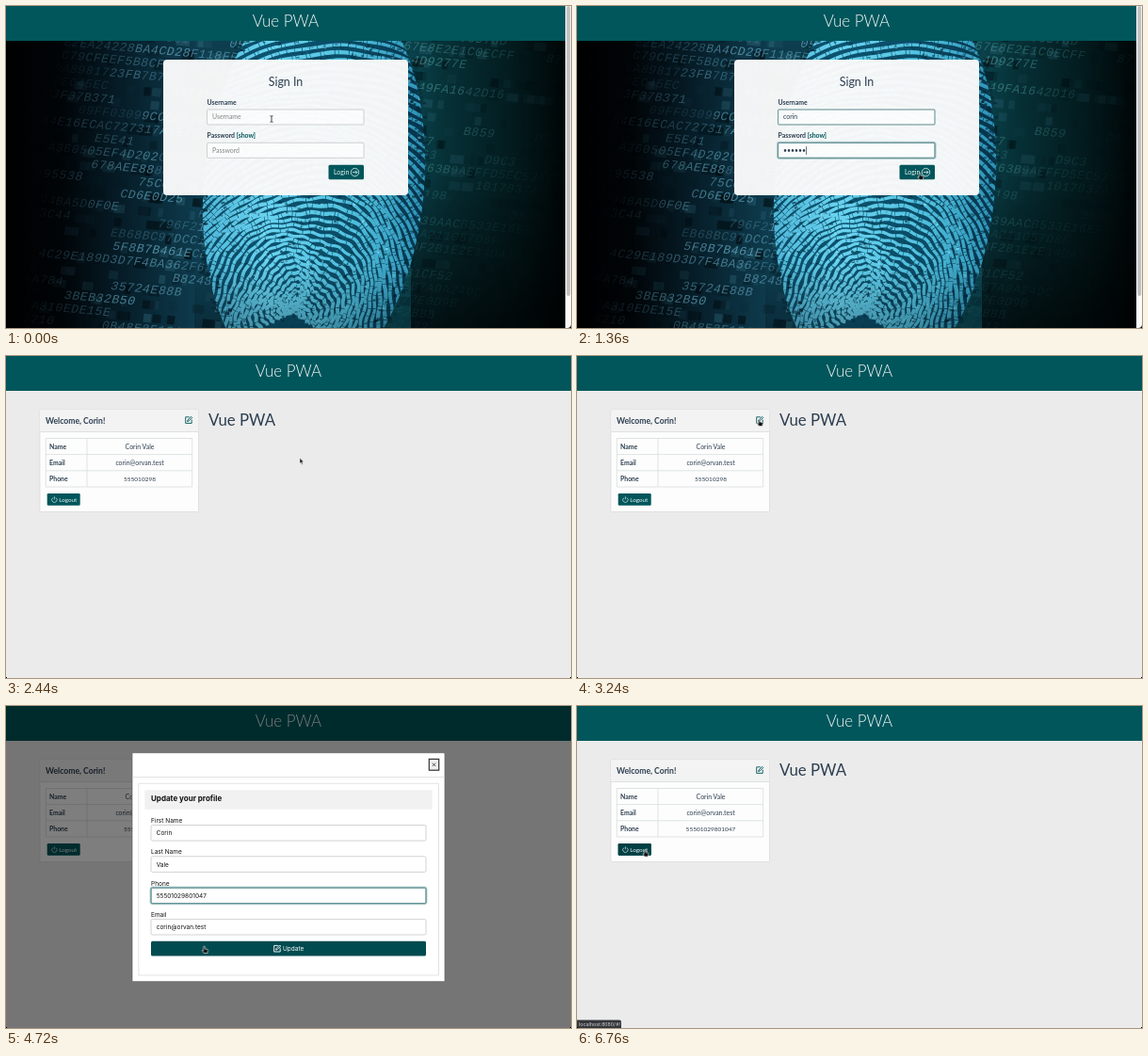
An HTML page with a canvas for the animation above (6.8 s loop, 600 px wide and 342 px high).

```html
<!DOCTYPE html>
<html lang="en">
<head>
<meta charset="utf-8">
<title>Vue PWA</title>
<style>
html, body { margin: 0; width: 100%; height: 100%; overflow: hidden; background: #000; }
.stage { position: relative; width: 600px; height: 342px; overflow: hidden; border-radius: 0 0 4px 4px; }
canvas, svg { position: absolute; left: 0; top: 0; display: block; }
text { font-family: Lato, "Open Sans", sans-serif; font-size: 6.9px; fill: #2c3e50; white-space: pre; }
.b { font-weight: 700; }
.mid { text-anchor: middle; }
.title { font-size: 16.9px; font-weight: 300; fill: #f2f7f7; }
.white { fill: #eaf3f3; }
.hint { fill: #858585; }
.teal { fill: #00565b; }
.line { fill: none; stroke: #3f8083; }
.field { fill: #fff; fill-opacity: .6; stroke: #bdc0c2; stroke-width: .7; }
.glow { fill: none; stroke: #00565b; stroke-opacity: .25; stroke-width: 2.2; }
.modal text { font-family: Inter, Roboto, sans-serif; font-size: 6.5px; fill: #111; }
.modal .white { fill: #fff; }
.alert text { font-family: Roboto, Inter, sans-serif; }

/* one shared 6.8 s clock; hard switches unless stated otherwise */
.on, .typed tspan, .caret, .mouse { animation: 6.8s step-end infinite; }
.typed tspan { fill-opacity: 0; animation-name: typed; animation-delay: var(--d); }
.login { animation-name: login; }
.dash { animation-name: dash; }
.skeleton { animation-name: skeleton; }
.card { animation-name: card; }
.alert { animation-name: alert; }
.modal { animation-name: modal; }
.before { animation-name: before; }
.after { animation-name: after; }
.idle1 { animation-name: idle1; }
.valid { animation-name: valid; }
.focus1 { animation-name: focus1; }
.idle2 { animation-name: idle2; }
.focus2 { animation-name: focus2; }
.focus3 { animation-name: focus3; }
.hover { animation-name: hover; }
.ibeam { animation-name: ibeam; }
.arrow { animation-name: arrow; }
.hand { animation-name: hand; }
.caret { fill: #444; }
.c1 { animation-name: caret1; animation-timing-function: steps(5, start); }
.c2 { animation-name: caret2; animation-timing-function: steps(6, start); }
.c3 { animation-name: caret3; animation-timing-function: steps(5, start); }
.mouse { animation-name: mouse; animation-timing-function: ease-in-out; }

@keyframes typed { 0% { fill-opacity: 1; } 60%, 100% { fill-opacity: 0; } }
@keyframes login { 0% { opacity: 1; } 20.59%, 100% { opacity: 0; } }
@keyframes dash { 0% { opacity: 0; } 20.59%, 100% { opacity: 1; } }
@keyframes skeleton { 0% { opacity: 1; } 30%, 100% { opacity: 0; } }
@keyframes card { 0% { opacity: 0; } 30%, 100% { opacity: 1; } }
@keyframes alert { 0% { opacity: 0; } 23.53% { opacity: 1; } 33.53%, 100% { opacity: 0; } }
@keyframes modal { 0% { opacity: 0; } 50.59% { opacity: 1; } 71.18%, 100% { opacity: 0; } }
@keyframes before { 0% { opacity: 1; } 71.18%, 100% { opacity: 0; } }
@keyframes after { 0% { opacity: 0; } 71.18%, 100% { opacity: 1; } }
@keyframes idle1 { 0% { opacity: 1; } 2.35%, 100% { opacity: 0; } }
@keyframes valid { 0% { opacity: 0; } 2.35%, 100% { opacity: 1; } }
@keyframes focus1 { 0% { opacity: 0; } 2.35% { opacity: 1; } 10.59%, 100% { opacity: 0; } }
@keyframes idle2 { 0% { opacity: 1; } 10.59%, 100% { opacity: 0; } }
@keyframes focus2 { 0% { opacity: 0; } 10.59%, 100% { opacity: 1; } }
@keyframes focus3 { 0% { opacity: 0; } 55.88%, 100% { opacity: 1; } }
@keyframes hover { 0% { opacity: 0; } 82.94%, 100% { opacity: 1; } }
@keyframes ibeam { 0% { opacity: 1; } 2.94% { opacity: 0; } 55.29% { opacity: 1; } 58.24%, 100% { opacity: 0; } }
@keyframes arrow {
  0% { opacity: 0; } 17.06% { opacity: 1; } 19.41% { opacity: 0; } 21.18% { opacity: 1; }
  44.12% { opacity: 0; } 50.59% { opacity: 1; } 55.29% { opacity: 0; } 64.12% { opacity: 1; }
  67.06% { opacity: 0; } 71.18% { opacity: 1; } 82.94%, 100% { opacity: 0; }
}
@keyframes hand {
  0% { opacity: 0; } 19.41% { opacity: 1; } 21.18% { opacity: 0; } 44.12% { opacity: 1; }
  50.59% { opacity: 0; } 67.06% { opacity: 1; } 71.18% { opacity: 0; } 82.94%, 100% { opacity: 1; }
}
@keyframes caret1 { 0%, 3.53% { transform: none; } 9.41%, 100% { transform: translateX(17px); } }
@keyframes caret2 { 0%, 12.94% { transform: none; } 18.24%, 100% { transform: translateX(24px); } }
@keyframes caret3 {
  0%, 57.65% { transform: none; opacity: 1; }
  63.53%, 64.7% { transform: translateX(20px); opacity: 1; }
  64.71%, 100% { transform: translateX(20px); opacity: 0; }
}
@keyframes mouse {
  0%, 17.06% { transform: translate(282px, 120px); }
  19.71%, 21.18% { transform: translate(364px, 177px); }
  28.24%, 34.12% { transform: translate(320px, 111px); }
  44.12%, 51.18% { transform: translate(193.5px, 67px); }
  55.88%, 64.12% { transform: translate(246px, 202px); }
  68.24%, 70.6% { transform: translate(210.5px, 255px); }
  71.77%, 75.3% { transform: translate(211px, 260px); }
  83.5%, 100% { transform: translate(72px, 152.5px); }
}
</style>
</head>
<body>
<div class="stage">
<canvas id="bg" width="600" height="342"></canvas>
<svg width="600" height="342" viewBox="0 0 600 342">
  <defs>
    <linearGradient id="bar"><stop stop-color="#d6d6d6"/><stop offset=".45" stop-color="#cbcbcb"/><stop offset="1" stop-color="#e0e0e0"/></linearGradient>
    <g id="pencil" fill="none" stroke="currentColor" stroke-width=".9">
      <path d="M4.8 .8H.7V7.4H7.2V3.6"/><path d="M2.6 5.5L3 4L6.6 .4L7.7 1.5L4.1 5.1Z"/>
    </g>
    <filter id="shade" x="-10%" y="-10%" width="120%" height="130%"><feDropShadow dx="0" dy="1" stdDeviation="2" flood-opacity=".4"/></filter>
  </defs>

  <g class="on login">
    <rect class="teal" width="594" height="37"/>
    <text class="title mid" x="297" y="22">Vue PWA</text>
    <rect x="594" width="6" height="342" fill="#fafafa"/>
    <rect x="595.2" y="0" width="4" height="308" rx="2" fill="#c1c1c1"/>
    <rect x="167" y="57" width="260" height="144" rx="4" fill="#fafafa" fill-opacity=".97"/>
    <text class="mid" x="297" y="84.5" style="font-size:12.4px">Sign In</text>
    <text class="b" x="213.5" y="104.6">Username</text>
    <rect class="field" x="213.5" y="110" width="166.5" height="16" rx="1"/>
    <text class="hint on idle1" x="219" y="120.4">Username</text>
    <rect class="line on valid" x="213.5" y="110" width="166.5" height="16" rx="1" stroke-width=".7"/>
    <g class="on focus1">
      <rect class="glow" x="213" y="109.5" width="167.5" height="17" rx="2"/>
      <rect class="caret c1" x="219" y="113.5" width=".7" height="9"/>
    </g>
    <text class="typed" x="219" y="120.4"><tspan style="--d:240ms">c</tspan><tspan style="--d:320ms">o</tspan><tspan style="--d:400ms">r</tspan><tspan style="--d:480ms">i</tspan><tspan style="--d:560ms">n</tspan></text>
    <text class="b" x="213.5" y="140.2">Password <tspan class="teal">[show]</tspan></text>
    <rect class="field" x="213.5" y="145.3" width="166.5" height="16" rx="1"/>
    <text class="hint on idle2" x="219" y="155.7">Password</text>
    <g class="on focus2">
      <rect class="glow" x="213" y="144.8" width="167.5" height="17" rx="2"/>
      <rect class="line" x="213.5" y="145.3" width="166.5" height="16" rx="1" stroke-width=".7"/>
      <rect class="caret c2" x="219" y="149" width=".7" height="9"/>
    </g>
    <text class="typed" x="219" y="155.7"><tspan style="--d:880ms">•</tspan><tspan style="--d:940ms">•</tspan><tspan style="--d:1000ms">•</tspan><tspan style="--d:1060ms">•</tspan><tspan style="--d:1120ms">•</tspan><tspan style="--d:1180ms">•</tspan></text>
    <rect class="teal" x="342.5" y="168.8" width="37.5" height="15.4" rx="1.5"/>
    <text class="white" x="348" y="178.8">Login</text>
    <g fill="none" stroke="#eaf3f3" stroke-width=".8"><circle cx="370.5" cy="176.6" r="4.2"/><path d="M368 176.6H373M371 174.6L373 176.6L371 178.6"/></g>
  </g>

  <g class="on dash">
    <rect width="600" height="342" fill="#ebebeb"/>
    <rect class="teal" width="600" height="37"/>
    <text class="title mid" x="300" y="22">Vue PWA</text>
    <text x="215" y="74" style="font-size:16.8px">Vue PWA</text>

    <g class="on skeleton">
      <rect x="36" y="57" width="168.5" height="55" fill="#fff" stroke="#dedede" stroke-width=".7"/>
      <g fill="url(#bar)">
        <rect x="42" y="63.7" width="62.5" height="6.5" rx="1"/>
        <rect x="42" y="72.2" width="156" height="6.5" rx="1"/>
        <rect x="42" y="80.6" width="156" height="6.5" rx="1"/>
        <rect x="42" y="89" width="156" height="6.5" rx="1"/>
        <rect x="42" y="97.3" width="156" height="6.5" rx="1"/>
      </g>
    </g>

    <g class="on card">
      <rect x="36" y="57" width="168.5" height="108.5" rx="1" fill="#fdfdfd" stroke="#d8d8d8" stroke-width=".7"/>
      <path d="M36.3 57.3H204.2V80.5H36.3Z" fill="#f3f3f3"/>
      <path d="M36 80.5H204.5M42.3 87.5H197.7V139H42.3ZM42.3 104.6H197.7M42.3 121.8H197.7M86 87.5V139" fill="none" stroke="#d9dcde" stroke-width=".8"/>
      <text class="b" x="42" y="71.7" style="font-size:8.6px">Welcome, Corin!</text>
      <use href="#pencil" x="190" y="64" color="#00565b"/>
      <g class="b"><text x="46" y="98.5">Name</text><text x="46" y="115.5">Email</text><text x="46" y="132.6">Phone</text></g>
      <g class="mid">
        <text x="142" y="98.5">Corin Vale</text>
        <text x="142" y="115.5">corin@orvan.test</text>
        <text class="on before" x="142" y="132.6" style="font-size:6.5px">555010298</text>
        <text class="on after" x="142" y="132.6" style="font-size:6.5px">55501029801047</text>
      </g>
      <rect class="teal" x="43.7" y="146" width="35" height="12.8" rx="1.3"/>
      <rect class="on hover" x="43.7" y="146" width="35" height="12.8" rx="1.3" fill="#003f43"/>
      <path d="M49.8 150.6A2.7 2.7 0 1 0 53 150.6M51.4 149.3V152.4" fill="none" stroke="#dce9e9" stroke-width=".7"/>
      <text class="white" x="56.2" y="154.8" style="font-size:6.3px">Logout</text>
    </g>

    <g class="on alert">
      <path d="M206.8 0H393.5V122.5Q393.5 125.5 390.5 125.5H209.8Q206.8 125.5 206.8 122.5Z" fill="#202124" filter="url(#shade)"/>
      <g fill="none" stroke="#3a3c40" stroke-width="1">
        <path d="M207 27C219 23 222 40 234 37S245 31 254 36M312 21C329 21 329 10 334 10S341 6 343 0"/>
        <path d="M228.5 15.5V25M224.4 17.8L232.6 22.7M224.4 22.7L232.6 17.8"/>
        <path d="M254 5H281V43H254ZM262 5V0H273V5M281 11H312.5V38H281ZM276 40H319"/>
        <path d="M376.5 27A4 4 0 0 1 384.5 27ZM380.5 27V41"/>
      </g>
      <path d="M268 17.2L278 33.2H258Z" fill="#e8826f" stroke="#f3b8aa" stroke-width=".8" stroke-dasharray="1.2 .8"/>
      <path d="M268 22.5V28M268 29.5V31" stroke="#202124" stroke-width="1.5"/>
      <g fill="#6da5ee"><circle cx="280" cy="26.5" r="1.8"/><circle cx="286" cy="26.5" r="1.8"/><circle cx="292" cy="26.5" r="1.8"/></g>
      <path d="M296.6 24V29" stroke="#c7cacf" stroke-width=".9"/>
      <text x="213.3" y="61.3" style="font-size:6.9px;font-weight:500;fill:#e8eaed">Check your passwords</text>
      <g style="fill:#9aa0a6">
        <text x="213.3" y="76.4" style="font-size:5.1px;fill:inherit">Velbro found the password that you just used in a data breach. To</text>
        <text x="213.3" y="84.8" style="font-size:5.1px;fill:inherit">secure your accounts, we recommend changing it now and then</text>
        <text x="213.3" y="93.2" style="font-size:5.1px;fill:inherit">checking your saved passwords.</text>
      </g>
      <circle cx="218.4" cy="112" r="2.8" fill="none" stroke="#9aa0a6" stroke-width=".7"/>
      <path d="M218.4 111.5V113.6M218.4 110.2V110.8" stroke="#9aa0a6" stroke-width=".7"/>
      <rect x="301" y="105.5" width="26" height="13" rx="1.5" fill="#25282d"/>
      <text x="306.7" y="113.9" style="font-size:5.3px;font-weight:500;fill:#8ab4f8">Close</text>
      <rect x="330.3" y="105.3" width="56.4" height="13.2" rx="1.7" fill="#7ea8f0"/>
      <text class="mid" x="358.5" y="113.8" style="font-size:5.4px;font-weight:500;fill:#202124">Check passwords</text>
    </g>

    <g class="on modal">
      <rect width="600" height="342" fill-opacity=".5"/>
      <rect x="134" y="49.7" width="332" height="243" rx="1" fill="#fff" stroke="#5c5c5c" stroke-width=".7"/>
      <path d="M134.3 75.5H465.7M140.8 82.3H459.5V286H140.8Z" fill="none" stroke="#dcdcdc" stroke-width=".8"/>
      <rect x="449.3" y="56.4" width="10.4" height="11.8" fill="#efefef" stroke="#333" stroke-width="1.2"/>
      <path d="M452.8 60.6L456.2 64M456.2 60.6L452.8 64" stroke="#222" stroke-width=".8"/>
      <rect x="147.3" y="89.3" width="305.4" height="20.4" fill="#f1f1f1"/>
      <text class="b" x="154" y="101" style="font-size:8px">Update your profile</text>
      <text x="154" y="123.8">First Name</text>
      <text x="154" y="157.2">Last Name</text>
      <text x="154" y="190.6">Phone</text>
      <text x="154" y="223.9">Email</text>
      <rect class="field" x="154" y="126.5" width="292" height="16.6" rx="1.5"/>
      <rect class="field" x="154" y="159.8" width="292" height="16.6" rx="1.5"/>
      <rect class="field" x="154" y="193.1" width="292" height="16.6" rx="1.5"/>
      <rect class="field" x="154" y="226.4" width="292" height="16.6" rx="1.5"/>
      <g class="on focus3">
        <rect class="glow" x="153.6" y="192.7" width="292.8" height="17.4" rx="2"/>
        <rect class="line" x="154" y="193.1" width="292" height="16.6" rx="1.5" stroke-width=".8"/>
        <rect class="caret c3" x="196.5" y="197" width=".7" height="9"/>
      </g>
      <text x="159.7" y="137.2">Corin</text>
      <text x="159.7" y="170.5">Vale</text>
      <text class="typed" x="159.7" y="203.8">555010298<tspan style="--d:3920ms">0</tspan><tspan style="--d:4000ms">1</tspan><tspan style="--d:4080ms">0</tspan><tspan style="--d:4160ms">4</tspan><tspan style="--d:4240ms">7</tspan></text>
      <text x="159.7" y="237.2">corin@orvan.test</text>
      <rect class="teal" x="154" y="249.8" width="292" height="15.7" rx="1.5" style="fill:#004b50"/>
      <use href="#pencil" x="284" y="253.6" color="#fff"/>
      <text class="white" x="294" y="260">Update</text>
    </g>

    <g class="on hover">
      <path d="M0 333.5H45Q47 333.5 47 335.5V342H0Z" fill="#35363a"/>
      <text x="2" y="339.8" style="font-family:Roboto,sans-serif;font-size:5.6px;fill:#c4c7ca">localhost:8080/#!</text>
    </g>
  </g>

  <g class="mouse">
    <path class="on ibeam" d="M-1.5 -3.4Q0 -3.4 0 -2.4Q0 -3.4 1.5 -3.4M0 -2.4V2.4M-1.5 3.4Q0 3.4 0 2.4Q0 3.4 1.5 3.4" fill="none" stroke="#222" stroke-width=".8"/>
    <path class="on arrow" d="M0 0V6.2L1.4 5L2.3 7.2L3.4 6.7L2.5 4.6H4.3Z" fill="#111" stroke="#fff" stroke-width=".6"/>
    <path class="on hand" d="M0 0Q.9 0 .9 1V3L3.4 3.5Q4.2 3.7 4 4.6L3.4 7.6H-.2L-2.1 4.9Q-2 3.8 -.8 4.6V1Q-.8 0 0 0Z" fill="#111" stroke="#fff" stroke-width=".6"/>
  </g>
</svg>
</div>
<script>
const ctx = document.getElementById('bg').getContext('2d');
let seed = 77;
const rnd = () => (seed = (seed * 16807) % 2147483647) / 2147483647;

function gradient(x0, y0, x1, y1, stops) {
  const g = ctx.createLinearGradient(x0, y0, x1, y1);
  stops.forEach(([at, color]) => g.addColorStop(at, color));
  return g;
}

// brightness of the wall: black at both sides, fading downwards on the right
function light(x, y) {
  const left = Math.max(0, Math.min(1, (x - 45) / 130));
  const right = Math.max(0, Math.min(1, (600 - x) / 150)) * (1.1 - y / 380);
  return x < 320 ? left : right;
}

function backdrop() {
  ctx.fillStyle = gradient(0, 0, 600, 0, [[0, '#000'], [.1, '#010508'], [.22, '#07202c'],
    [.34, '#0e3c4e'], [.7, '#0b4650'], [.78, '#063036'], [.9, '#031a1d'], [1, '#000304']]);
  ctx.fillRect(0, 0, 600, 342);
  ctx.save();
  ctx.transform(1, .09, -.12, 1, 0, 0);
  for (let i = 0; i < 800; i++) {
    const x = rnd() * 640, y = Math.floor(rnd() * 27) * 14 - 40;
    const a = rnd() * light(x, y);
    ctx.fillStyle = rnd() < .5 ? `rgba(0,5,8,${a * .6})` : `rgba(62,125,145,${a * .3})`;
    ctx.fillRect(x, y, 5 + rnd() * 10, 9);
  }
  ctx.restore();
  ctx.fillStyle = gradient(0, 170, 0, 342, [[0, 'rgba(0,0,0,0)'], [1, 'rgba(0,0,0,.7)']]);
  ctx.fillRect(430, 37, 170, 305);
}

function hexRows() {
  ctx.save();
  ctx.transform(1, .09, -.12, 1, 0, 0);
  ctx.font = 'italic 13px "Liberation Mono", monospace';
  for (let y = -20; y < 350; y += 14) {
    let run = 0, alpha = 0;
    for (let x = 50 + rnd() * 20; x < 630; x += 8.4) {
      const left = x < 320;
      if (run-- <= 0) {
        run = 2 + rnd() * 7;
        alpha = rnd() < (left ? .25 : .55) ? 0 : .25 + rnd() * (left ? .5 : .3);
      }
      const a = alpha * light(x, y);
      ctx.fillStyle = left ? `rgba(105,175,200,${a})` : `rgba(85,170,170,${a})`;
      ctx.fillText('0123456789ABCDEF'[rnd() * 16 | 0], x, y);
    }
  }
  ctx.restore();
}

// arched ridges rising from a core near the lower edge, broken up by dark pores
function fingerprint() {
  const cx = 327, cy = 190, rx = 117, ry = 218, tilt = .09;
  ctx.save();
  ctx.beginPath();
  ctx.ellipse(cx, cy, rx, ry, tilt, 0, 7);
  ctx.clip();
  ctx.fillStyle = gradient(205, 0, 447, 0, [[0, '#0b4a63'], [.3, '#0c5470'], [.7, '#0a4a64'], [1, '#06334a']]);
  ctx.fillRect(200, 37, 255, 305);
  ctx.strokeStyle = gradient(205, 0, 447, 0, [[0, '#4db4d6'], [.3, '#69d3f0'], [.65, '#52c2e0'], [1, '#2b8fb3']]);
  for (let r = 5; r < 310; r += 6.6) {
    const phase = rnd() * 6;
    ctx.beginPath();
    ctx.lineWidth = 3.2 + rnd() * 1.2;
    ctx.setLineDash([5 + rnd() * 12, .7, 3 + rnd() * 8, .5]);
    for (let a = -3.6; a <= .5; a += .03) {
      const d = r + 5 * Math.sin(4 * a + r / 22) + .9 * Math.sin(23 * a + phase);
      ctx.lineTo(303 + d * .88 * Math.cos(a) - d * .12 * Math.sin(a), 326 + d * Math.sin(a));
    }
    ctx.stroke();
  }
  for (let i = 0; i < 1500; i++) {
    ctx.fillStyle = rnd() < .75 ? `rgba(3,32,48,${rnd() * .65})` : `rgba(150,235,255,${rnd() * .6})`;
    ctx.fillRect(205 + rnd() * 242, 37 + rnd() * 305, 1 + rnd() * 2.5, 1 + rnd() * 1.5);
  }
  ctx.restore();

  // ragged outline
  for (let i = 0; i < 420; i++) {
    const a = rnd() * 6.3, k = 1.03 - rnd() * rnd() * .16;
    const x = k * rx * Math.cos(a), y = k * ry * Math.sin(a);
    ctx.fillStyle = `rgba(6,42,56,${.4 + rnd() * .5})`;
    ctx.fillRect(cx + x - y * tilt - 2, cy + y + x * tilt - 1, 2 + rnd() * 3, 1.5 + rnd() * 2);
  }
  ctx.fillStyle = gradient(0, 270, 0, 342, [[0, 'rgba(0,10,16,0)'], [1, 'rgba(0,10,16,.3)']]);
  ctx.fillRect(200, 270, 250, 72);
}

backdrop();
hexRows();
fingerprint();
</script>
</body>
</html>
```
